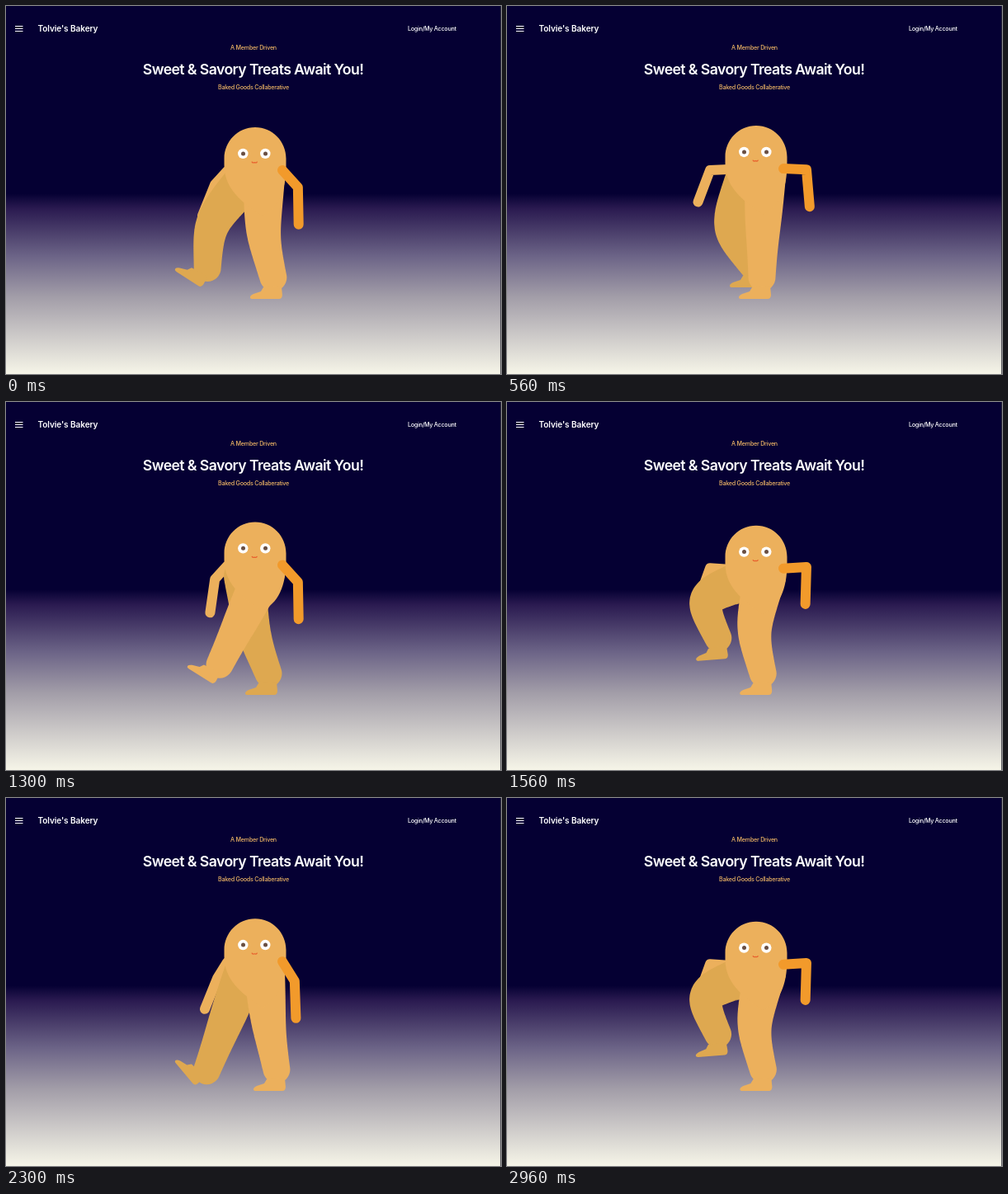
Recreate the animation shown at these times as an HTML page with a canvas. Size 600 by 446 pixels, loop 3000 ms.

```html
<!DOCTYPE html>
<html lang="en">
<head>
<meta charset="utf-8">
<title>Bakery</title>
<style>
  html, body { margin: 0; width: 100%; height: 100%; overflow: hidden; }
  body { background: linear-gradient(#050033 51%, #2a1a50 55%, #6c6487 68%, #a29da8 79%, #f6f5e8); }
  svg, canvas { position: absolute; left: 0; top: 0; }
  text { font: 500 7.15px Inter, "Open Sans", sans-serif; letter-spacing: -.035em; fill: #fff; }
  .mid { text-anchor: middle; fill: #efb665; }
  .brand { font-size: 10.1px; font-weight: 600; letter-spacing: -.01em; }
  .title { font-size: 17.7px; font-weight: 600; letter-spacing: -.034em; fill: #fff; }
</style>
</head>
<body>
<svg width="600" height="446">
  <path d="M11 24.5h9.5M11 27.5h9.5M11 30.5h9.5" stroke="#fff"/>
  <path d="M599.5 0v446" stroke="#2a2a35" opacity=".7"/>
  <text class="brand" x="38.5" y="30.5">Tolvie's Bakery</text>
  <text x="487" y="30">Login/My Account</text>
  <text class="mid" x="300" y="52.5">A Member Driven</text>
  <text class="mid title" x="299.5" y="83">Sweet &amp; Savory Treats Await You!</text>
  <text class="mid" x="300" y="100.5">Baked Goods Collaberative</text>
</svg>
<canvas id="stage" width="600" height="446"></canvas>
<script>
const ctx = document.getElementById('stage').getContext('2d');
const LIGHT = '#ecb05c', SHADE = '#dea850', ORANGE = '#f29a2b';
const { PI, sin, cos, sqrt, abs, max } = Math, RAD = PI / 180;

// Pace of the walk: [tick of 1/30 s, cycles walked]
const pace = [[0, -.03], [17, 1.1], [29, 2.18], [39, 2.53], [56, 3.25], [69, 4], [89, 4.87], [90, 4.97]];

// Path of one foot through a cycle: [phase, x, y, angle]; the kick is at phase 0
const step = [
  [0, 230, 330, 50], [.03, 233, 324, 32], [.1, 295, 328, 0],
  [.18, 292, 342, 0], [.36, 292, 342, 0], [.53, 315, 342, 0], [.6, 292, 342, 0],
  [.68, 313, 315, -50], [.75, 311, 302, -50], [.86, 255, 297, -8],
  [.97, 232, 323, 33], [1, 230, 330, 50]
];

const foot = new Path2D('M-22 13H10Q14 13 14 8L13 -3 -9 -1 -12 4 -21 7Q-25 9 -25 11T-22 13Z');
const torso = new Path2D('M-37.5 46V38C-37.5 17 -21 0 0 0S37.5 17 37.5 38V46C37.5 78 28 98 8 108C-10 94 -37.5 78 -37.5 46Z');
const mouth = new Path2D('M-3.8 42q1 1.4 3 .6q2 .8 3 -.6');

// Values of a list of keys at position t
function along(keys, t) {
  const i = keys.findIndex(k => k[0] > t), a = keys[i - 1], b = keys[i];
  const u = (t - a[0]) / (b[0] - a[0]);
  return a.slice(1).map((v, n) => v + (b[n + 1] - v) * u);
}

const wrap = p => p - Math.floor(p);

// Angles are measured from hanging straight down; side is 1 for right, -1 for left
function arm(x, y, side, upper, lower, raise, bend, color) {
  ctx.beginPath();
  ctx.moveTo(x, y);
  x += side * upper * sin(raise * RAD);
  y += upper * cos(raise * RAD);
  ctx.lineTo(x, y);
  ctx.lineTo(x + side * lower * sin(bend * RAD), y + lower * cos(bend * RAD));
  ctx.strokeStyle = color;
  ctx.stroke();
}

// A tapered curve from hip to ankle whose knee bends forward as the two come closer
function leg(hx, hy, shift, phase, color) {
  const [x, fy, deg] = along(step, wrap(phase)), fx = x + shift;
  const turn = deg * RAD, lean = turn * (turn > 0 ? 1.6 : .3);
  const ax = fx + 3 * cos(lean) + 13 * sin(lean), ay = fy + 3 * sin(lean) - 13 * cos(lean);
  const dx = ax - hx, dy = ay - hy, reach = Math.hypot(dx, dy);
  const bend = .9 * sqrt(max(0, 61 ** 2 - reach ** 2 / 4)) / reach;
  const kx = hx + dx * .55 - dy * bend, ky = hy + dy * .55 + dx * bend;
  const curve = (h, k, a, u) => h * (1 - u) ** 3 + 3 * k * u * (1 - u) + a * u ** 3;
  ctx.fillStyle = color;
  ctx.beginPath();
  for (let u = 0; u <= 1; u += 1 / 80) {
    const cx = curve(hx, kx, ax, u), cy = curve(hy, ky, ay, u), r = 25 - 8.5 * u;
    ctx.moveTo(cx + r, cy);
    ctx.arc(cx, cy, r, 0, 7);
  }
  ctx.fill();
  ctx.save();
  ctx.translate(fx, fy);
  ctx.rotate(turn);
  ctx.fill(foot);
  ctx.restore();
}

function dot(x, y, r, color) {
  ctx.fillStyle = color;
  ctx.beginPath();
  ctx.arc(x, y, r, 0, 7);
  ctx.fill();
}

function body(top) {
  ctx.save();
  ctx.translate(302, top);
  ctx.fillStyle = LIGHT;
  ctx.fill(torso);
  for (const x of [-14.7, 12.3]) {
    dot(x, 31.9, 6.2, '#fff');
    dot(x + .2, 31.9, 2.5, '#6a4f42');
  }
  ctx.lineWidth = 1.3;
  ctx.strokeStyle = '#e8622f';
  ctx.stroke(mouth);
  ctx.restore();
}

function draw(now) {
  const [phase] = along(pace, Math.floor(now * .03 + .21) % 90);
  const turn = 2 * PI * phase;
  const top = 147.5 - 2.5 * cos(2 * turn - 1);
  const raise = 95 - 63 * abs(cos(turn)) ** 10; // both arms drop at each kick
  ctx.clearRect(0, 0, 600, 446);
  ctx.lineCap = ctx.lineJoin = 'round';
  ctx.lineWidth = 12;
  arm(268, top + 53, -1, 22, 41, raise, 15 + 7 * cos(turn), LIGHT);
  leg(289, top + 66, 0, phase, SHADE);
  leg(313, top + 62, 14, phase + .5, LIGHT);
  body(top);
  arm(335, top + 52, 1, 28, 45, raise, 2 + 5 * sin(turn), ORANGE);
  requestAnimationFrame(() => draw(performance.now()));
}
draw(0);
</script>
</body>
</html>
```
